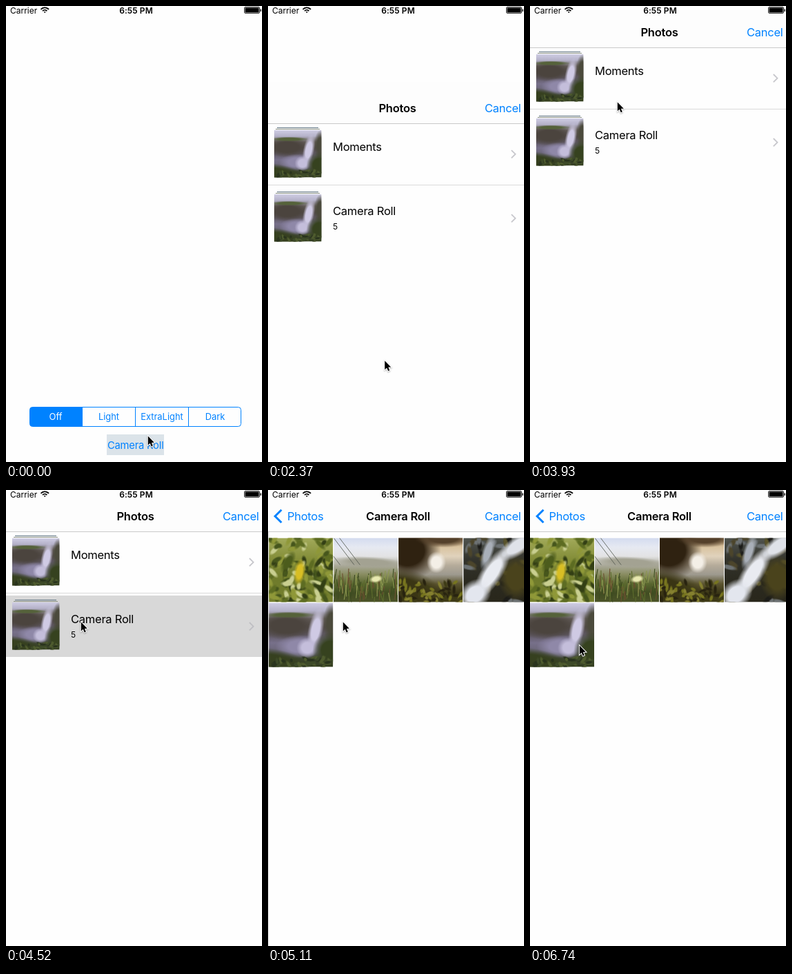
Animation, 371 px wide and 661 px high, one loop 8000 ms. Source, as an HTML page with a canvas:

```html
<!DOCTYPE html>
<html lang="en">
<head>
<meta charset="utf-8">
<title>Photo picker</title>
<style>
html, body { margin: 0; width: 100%; height: 100%; overflow: hidden; background: #fefefe; }
canvas { display: block; width: 371px; height: 661px; }
</style>
</head>
<body>
<canvas id="stage" width="371" height="661"></canvas>
<script>
const ctx = document.getElementById('stage').getContext('2d');
const W = 371, H = 661, LOOP = 8000;
const TICK = 146; // the screen refreshes at this interval
const BAR = 60;   // height of the navigation bar
const BLUE = '#0082ff', PAPER = '#fefefe';
const FAMILY = 'Inter, Roboto, sans-serif';

// Pointer moves: from time, to time, end point
const moves = [
  [0, 1340, 191, 634], [2080, 2920, 117, 236], [2920, 3066, 114, 174], [3066, 3500, 127, 135],
  [3780, 4080, 108, 190], [5110, 5550, 82, 241], [5550, 6150, 78, 240], [6150, 6700, 71, 224]
];

function pointerAt(t) {
  let x = 205, y = 622;
  for (const [from, to, endX, endY] of moves) {
    const k = Math.min(1, Math.max(0, (t - from) / (to - from)));
    x += (endX - x) * k;
    y += (endY - y) * k;
  }
  return [x, y];
}

// Remaining share of a critically damped spring move
function springLeft(t, start) {
  const u = Math.max(0, t - start) * 0.0195;
  const left = (1 + u) * Math.exp(-u);
  return left < 0.002 ? 0 : left;
}

function rect(x, y, w, h, color) {
  ctx.fillStyle = color;
  ctx.fillRect(x, y, w, h);
}

function text(str, x, y, size, { color = '#000', weight = 400, align = 'left', gap = 0, alpha = 1 } = {}) {
  ctx.globalAlpha = alpha;
  ctx.font = `${weight} ${size}px ${FAMILY}`;
  ctx.letterSpacing = gap + 'px';
  ctx.textAlign = align;
  ctx.fillStyle = color;
  ctx.fillText(str, x, y);
  ctx.globalAlpha = 1;
}

const label = (str, x, y, opts) => text(str, x, y, 16.5, { gap: -0.25, ...opts });

function trace(points) {
  ctx.beginPath();
  for (let i = 0; i < points.length; i += 2) ctx.lineTo(points[i], points[i + 1]);
}

function line(points, color, width) {
  trace(points);
  ctx.strokeStyle = color;
  ctx.lineWidth = width;
  ctx.stroke();
}

// Chevron with its tip at x, y; a negative size points left
const chevron = (x, y, size, color, width) =>
  line([x - size, y - Math.abs(size), x, y, x - size, y + Math.abs(size)], color, width);

// Scenes are painted in a 100 by 100 box
function bands(...colors) {
  const g = ctx.createLinearGradient(0, 0, 0, 100);
  colors.forEach((c, i) => g.addColorStop(i / (colors.length - 1), c));
  rect(0, 0, 100, 100, g);
}

function soft(color, x, y, rx, ry, turn = 0) {
  ctx.save();
  ctx.translate(x, y);
  ctx.rotate(turn);
  ctx.scale(rx, ry);
  const g = ctx.createRadialGradient(0, 0, 0.5, 0, 0, 1);
  g.addColorStop(0, color);
  g.addColorStop(1, color + '00');
  rect(-1, -1, 2, 2, g);
  ctx.restore();
}

function randoms(seed) {
  return () => (seed = (seed * 16807) % 2147483647) / 2147483647;
}

function scatter(seed, count, colors, top, size) {
  const rnd = randoms(seed);
  for (let i = 0; i < count; i++) {
    const y = top + rnd() * (100 - top);
    soft(colors[i % colors.length], rnd() * 100, y, size * (0.6 + rnd()), size * 0.5, rnd() * 3);
  }
}

function leaves() {
  bands('#a2aa5a', '#838d38', '#6f7b2b', '#76802f');
  scatter(11, 120, ['#46561c', '#8f9838', '#c9cf90', '#5d6c22', '#333f14'], 0, 9);
  soft('#4c5c1c', 30, 38, 9, 20, 0.5);
  soft('#d8be24', 48, 53, 9, 21, 0.15);
}

function dunes() {
  bands('#d3dbef', '#e6e9f2', '#e3e3e4', '#aaa99a', '#888c60', '#59662f', '#414d22', '#4c5428');
  soft('#a3a292', 55, 38, 60, 9, 0.05);
  const rnd = randoms(5), tones = ['#3e4c20', '#8c9750', '#5d6c2d', '#6b5030'];
  for (let i = 0; i < 90; i++) {
    const x = rnd() * 100, y = 68 + rnd() * 36;
    line([x, y, x + rnd() * 8 - 4, y - 10 - rnd() * 14], tones[i % 4], 1.2);
  }
  for (const x of [-22, 0, 9]) line([x, 0, x + 32, 42], '#565b52', 0.9);
  soft('#e8e9b0', 66, 64, 11, 6, -0.2);
}

function goldenFalls() {
  bands('#a88a62', '#d9c3a0', '#e0d2bc', '#b5ab9a', '#9d998e', '#5c5530', '#3a3615', '#403c18');
  soft('#2f2211', 14, 20, 52, 46);
  soft('#54402a', 70, 0, 45, 15);
  soft('#f4efe7', 59, 38, 15, 17);
  soft('#3a3514', 10, 80, 62, 32, 0.25);
  scatter(23, 70, ['#77751f', '#28230f', '#858030', '#3f3c16'], 68, 6);
}

function rapids() {
  bands('#50544f', '#33332c', '#2b2a20', '#29271b');
  scatter(17, 50, ['#4c452b', '#1c1c18', '#59532b', '#6d7274'], 0, 9);
  soft('#4a431c', 82, 62, 28, 36);
  soft('#a9afb8', 38, 22, 9, 30, 0.3);
  soft('#dfe2e9', 85, 12, 38, 15, -0.6);
  soft('#e9ebf1', 44, 55, 48, 17, -1);
  soft('#e3e6ee', 18, 88, 28, 22, -0.7);
}

function bigFalls() {
  bands('#cfcde4', '#b5b2c9', '#655e5a', '#524b49', '#5f5863', '#77708a', '#6b6678', '#3d4530', '#333e20');
  soft('#4b443e', 28, 36, 48, 22);
  soft('#55623a', 32, 19, 42, 5);
  soft('#4b4a3c', 98, 32, 14, 32);
  soft('#8f88a8', 50, 68, 40, 18);
  soft('#cfcae4', 73, 42, 12, 34, 0.2);
  soft('#c4bedb', 60, 70, 17, 16);
  soft('#36421f', 96, 74, 28, 28);
  soft('#36401f', 10, 92, 60, 20, 0.2);
  scatter(13, 40, ['#4e5b2e', '#29331d', '#3d4a28'], 86, 6);
}

function photo(scene, x, y, size) {
  ctx.save();
  ctx.translate(x, y);
  ctx.scale(size / 100, size / 100);
  ctx.beginPath();
  ctx.rect(0, 0, 100, 100);
  ctx.clip();
  scene();
  ctx.restore();
}

function statusBar() {
  text('Carrier', 6, 10.5, 12);
  text('6:55 PM', 188.5, 10.5, 12, { weight: 600, align: 'center', gap: 0.1 });
  ctx.strokeStyle = '#000';
  [1, 4.2, 7.6].forEach(r => {
    ctx.beginPath();
    ctx.arc(56.2, 10, r, -Math.PI * 0.77, -Math.PI * 0.23);
    ctx.lineWidth = 1.8;
    ctx.stroke();
  });
  ctx.beginPath();
  ctx.roundRect(345.5, 1.5, 22, 9, 1.5);
  ctx.lineWidth = 0.8;
  ctx.stroke();
  rect(346.5, 2.5, 20, 7, '#000');
  rect(368.5, 4.5, 1.3, 3.5, '#000');
}

function home(pressed) {
  rect(0, 0, W, H, PAPER);
  ctx.beginPath();
  ctx.roundRect(34.5, 581.5, 306, 28, 4);
  ctx.save();
  ctx.clip();
  rect(34, 581, 77, 29, BLUE);
  ctx.restore();
  ctx.strokeStyle = BLUE;
  ctx.lineWidth = 1;
  ctx.stroke();
  ['Off', 'Light', 'ExtraLight', 'Dark'].forEach((name, i) => {
    if (i) rect(33 + i * 77, 581, 1, 29, BLUE);
    text(name, 72 + i * 77, 600.2, 12.9, { color: i ? BLUE : '#fff', align: 'center' });
  });
  rect(146, 621, 83, 30, '#dbe3e9');
  text('Camera Roll', 187.7, 641.6, 14.75,
    { color: pressed ? '#b6cee8' : BLUE, align: 'center', gap: -0.2 });
}

function albumRow(y, name, count, lit) {
  if (lit) rect(0, y - 1, W, 89, '#d8d8d8');
  rect(13, y + 5, 60, 1, '#5d7280');
  rect(11, y + 7, 64, 1, '#8a9086');
  photo(bigFalls, 9, y + 9, 68.5);
  label(name, 94, y + 39);
  text(count, 94, y + 60, 12);
  chevron(358.5, y + 43.7, 5.7, lit ? '#bfbfc3' : '#c7c7cc', 1.8);
}

function albums(lit) {
  rect(0, BAR, W, H - BAR, PAPER);
  albumRow(61, 'Moments', '', false);
  rect(0, 149, W, 1, '#dadada');
  albumRow(154, 'Camera Roll', '5', lit);
}

function roll(x) {
  rect(x, BAR, W, H - BAR, PAPER);
  if (x) rect(Math.floor(x) - 1, BAR, 1, H - BAR, '#d4d4d4');
  [leaves, dunes, goldenFalls, rapids, bigFalls].forEach((scene, i) =>
    photo(scene, x + (i % 4) * 94, 69.5 + Math.floor(i / 4) * 94, 93));
}

function navBar(left) {
  const shown = 1 - left;
  const mid = 53.7 + Math.min(133.8, 149 * left);
  const fade = ctx.createLinearGradient(290, 0, 312, 0);
  fade.addColorStop(0, '#000');
  fade.addColorStop(1, '#0000');
  rect(0, 0, W, BAR, '#fdfdfd');
  rect(0, BAR, W, 1, '#c9c9c9');
  label('Photos', mid, 44, { weight: 600, align: 'center', alpha: left ** 1.5 });
  label('Photos', mid, 44, { color: BLUE, align: 'center', alpha: shown });
  label('Camera Roll', 187.5 + 266 * left, 44,
    { weight: 600, align: 'center', color: fade, alpha: shown });
  ctx.globalAlpha = shown ** 4;
  chevron(10.2, 38, -9.3, BLUE, 3);
  ctx.globalAlpha = 1;
  label('Cancel', 366.5, 44, { color: BLUE, align: 'right' });
}

function picker(t, lit) {
  const left = springLeft(t, 4703);
  ctx.save();
  ctx.translate(0, springLeft(t, 2170) * H);
  ctx.save();
  ctx.translate(-0.3 * W * (1 - left), 0);
  albums(lit);
  ctx.restore();
  if (left < 1) {
    rect(0, BAR, W, H - BAR, `rgba(0,0,0,${0.1 * (1 - left)})`);
    roll(left * W);
  }
  navBar(left);
  ctx.restore();
}

function pointer(x, y) {
  ctx.save();
  ctx.translate(x + 0.8, y + 1.6);
  ctx.shadowColor = 'rgba(0,0,0,.3)';
  ctx.shadowBlur = 2;
  ctx.shadowOffsetY = 1;
  trace([0, 0, 0, 12.8, 2.9, 10.2, 4.9, 14.8, 7, 13.9, 5.1, 9.3, 9, 9.1]);
  ctx.closePath();
  ctx.strokeStyle = '#fff';
  ctx.lineWidth = 2;
  ctx.stroke();
  ctx.shadowColor = 'transparent';
  ctx.fillStyle = '#000';
  ctx.fill();
  ctx.restore();
}

function draw(now) {
  const clock = now % LOOP + 8;
  const t = Math.floor(clock / TICK) * TICK;
  home(clock >= 1630 && clock < 2080);
  picker(t, clock >= 4520);
  statusBar();
  pointer(...pointerAt(t));
}

const start = performance.now();
function frame(now) {
  draw(Math.max(0, now - start));
  requestAnimationFrame(frame);
}
frame(start);
</script>
</body>
</html>
```
